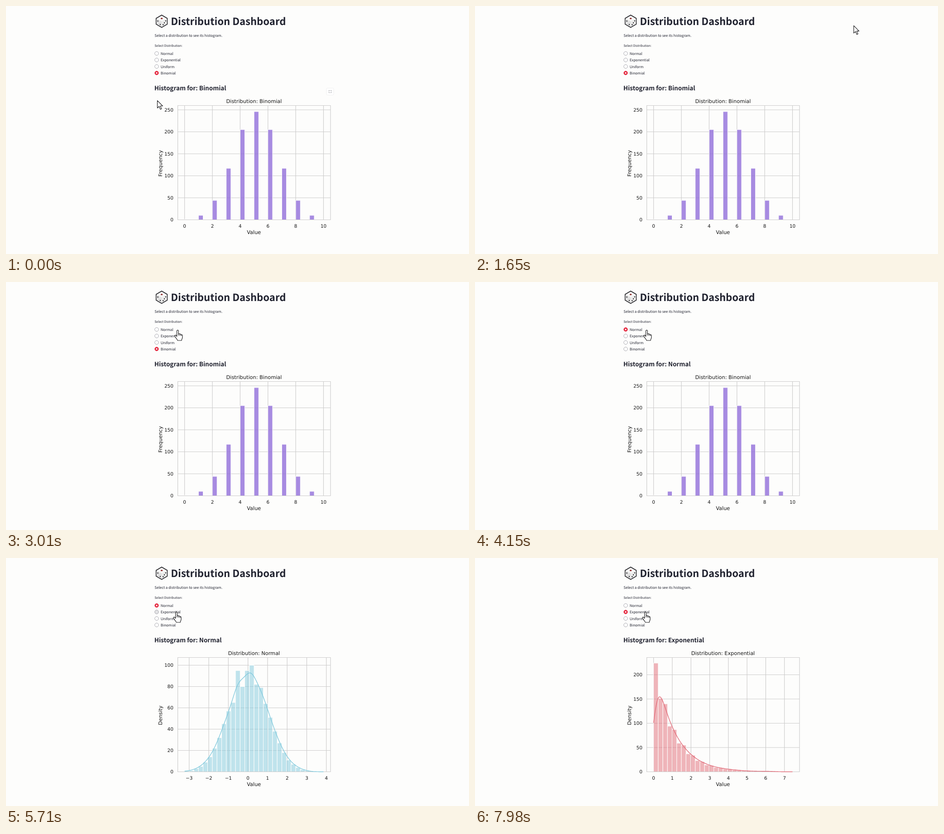
Write an HTML page that moves like this. It is 1023 px wide and 547 px high and loops after 8000 ms.

```html
<!DOCTYPE html>
<html lang="en">
<head>
<meta charset="utf-8">
<title>Distribution Dashboard</title>
<style>
  html, body { margin: 0; width: 100%; height: 100%; overflow: hidden; background: #fdfdfc; }
  svg { display: block; width: 1023px; height: 547px; }
  text { text-rendering: geometricPrecision; }
  .page { font-family: "Noto Sans CJK JP", "Noto Sans CJK SC", "Noto Sans", sans-serif; fill: #20222f; }
  .chart { font: 10.4px "DejaVu Sans", sans-serif; fill: #161616; }
  .chart .big { font-size: 11.34px; }
  .grid { fill: none; stroke: #cccbcb; stroke-width: 1.15; }
</style>
</head>
<body>
<svg viewBox="0 0 1023 547">
  <path d="M344 20L356.3 27.3V40L344 47.2L331.7 40V27.3Z" fill="#f6f6f5" stroke="#202024" stroke-width="1.7" stroke-linejoin="round"/>
  <path d="M344 34V46.2L332.6 39.5V28Z" fill="#e0e0e0"/>
  <path d="M344 34V46.2L355.4 39.5V28Z" fill="#ececeb"/>
  <ellipse cx="344" cy="27.4" rx="2.3" ry="1.5" fill="#8e2a2a"/>
  <path d="M335.5 33v.5M340.8 40.6v.5M347.2 41v.5M350 36.8v.5M352.8 32.6v.5" stroke="#26262a" stroke-width="2.3" stroke-linecap="round"/>
  <g class="page">
    <text x="364.3" y="42.3" font-size="22.1" font-weight="700">Distribution Dashboard</text>
    <text x="328.2" y="68.4" font-size="7.94">Select a distribution to see its histogram.</text>
    <text x="328.2" y="90.2" font-size="6.95">Select Distribution:</text>
    <text id="heading" x="327.8" y="185.7" font-size="13.5" font-weight="600"></text>
    <g id="radios"></g>
  </g>
  <g id="charts"></g>
  <g id="expand">
    <rect x="708" y="181" width="16" height="15.5" rx="2.5" fill="#fff" stroke="#ececec" stroke-width=".8"/>
    <path d="M713.6 188V186.4H715.2M717 186.4H718.6V188M718.6 189.6V191.2H717M715.2 191.2H713.6V189.6" fill="none" stroke="#85868d" stroke-width=".9"/>
  </g>
  <g id="cursor" fill="#fff" stroke="#1d1d1f" stroke-width="1.2" stroke-linejoin="round">
    <path id="arrow" d="M.5 .6V17L4.3 13.5L7.2 20L9.8 18.8L7 12.5H12.2Z"/>
    <path id="hand" d="M-2 2C-2-.5 1.6-.5 1.6 2V8.5C2.5 7.4 4.5 7.8 4.8 9.3C6 8.4 7.6 9 7.8 10.3C9.2 9.7 10.3 10.8 10.3 12V16C10.3 19 8.4 20 8.4 23H-.5C-.5 20.5-4.8 17.5-6.6 13.2C-7 11.3-4.8 10.6-3.6 12.2L-2 14.2ZM1.6 8.5V12M4.8 9.3V12.5M7.8 10.3V13"/>
  </g>
</svg>
<script>
const byId = id => document.getElementById(id);
const names = ['Normal', 'Exponential', 'Uniform', 'Binomial'];
const LEFT = 379.5, RIGHT = 717, TOP = 219.5, BASE = 471.5;
const BAR_START = 394.6, BAR_WIDTH = 10.23, BINS = 30;

const factorial = n => n < 2 ? 1 : n * factorial(n - 1);

// Expected counts of 1000 draws per bin, with a ripple for sampling variation
function normalCount(i) {
  const x = -3.25 + .2363 * (i + .5);
  const ripple = .17 * Math.cos(2.37 * (i - 11)) * Math.exp(-(((i - 12) / 3) ** 2));
  return 95 * Math.exp(-x * x / 2) * (1 + ripple);
}
const exponentialCount = i => 207 * Math.exp(-.235 * i) * (i % 2 ? .92 : 1.08);
function binomialCount(i) {
  const k = i / 3;
  return i % 3 ? 0 : 1000 / 1024 * factorial(10) / factorial(k) / factorial(10 - k);
}

// origin and unit are horizontal pixels; scale is pixels per count
const charts = {
  Normal: {
    origin: 534.6, unit: 43.3, first: -3, last: 4, xStep: 1, scale: 2.35, yStep: 20, max: 100,
    color: '#82cadd', alpha: .5, label: 'Density', count: normalCount, smooth: true
  },
  Exponential: {
    origin: 394.6, unit: 41.3, first: 0, last: 7, xStep: 1, scale: 1.07, yStep: 50, max: 200,
    color: '#e16c79', alpha: .5, label: 'Density', count: exponentialCount, smooth: true
  },
  Binomial: {
    origin: 394.6, unit: 30.69, first: 0, last: 10, xStep: 2, scale: .97, yStep: 50, max: 250,
    color: '#9370db', alpha: .8, label: 'Frequency', count: binomialCount
  }
};

const text = (x, y, str, anchor = 'middle', extra = '') =>
  `<text x="${x}" y="${y}" text-anchor="${anchor}" ${extra}>${str}</text>`;

// Gaussian density estimate, one bin wide
function densityPath(counts, scale) {
  const points = [];
  for (let u = 0; u <= BINS; u += .2) {
    const value = counts.reduce((sum, n, i) => sum + n * Math.exp(-((u - i - .5) ** 2) / 2), 0) / Math.sqrt(2 * Math.PI);
    points.push(`${(BAR_START + u * BAR_WIDTH).toFixed(2)} ${(BASE - value * scale).toFixed(2)}`);
  }
  return 'M' + points.join('L');
}

function drawChart(name) {
  const c = charts[name];
  const counts = Array.from({ length: BINS }, (_, i) => Math.round(c.count(i)));
  let grid = `M${LEFT} ${TOP}H${RIGHT}V${BASE}H${LEFT}Z`, labels = '', bars = '';
  for (let v = c.first; v <= c.last; v += c.xStep) {
    const x = c.origin + v * c.unit;
    grid += `M${x} ${TOP}V${BASE}`;
    labels += text(x, 488.8, String(v).replace('-', '−'));
  }
  for (let v = 0; v <= c.max; v += c.yStep) {
    const y = BASE - v * c.scale;
    grid += `M${LEFT} ${y}H${RIGHT}`;
    labels += text(369.8, y + 3.9, v, 'end');
  }
  counts.forEach((n, i) => {
    const h = n * c.scale;
    if (n) bars += `<rect x="${BAR_START + i * BAR_WIDTH}" y="${BASE - h}" width="${BAR_WIDTH}" height="${h}"/>`;
  });
  const curve = c.smooth
    ? `<path d="${densityPath(counts, c.scale)}" fill="none" stroke="${c.color}" stroke-width="1.4"/>` : '';
  return `<g id="chart${name}" class="chart"><path class="grid" d="${grid}"/>
    <g fill="${c.color}" fill-opacity="${c.alpha}" stroke="#fdfdfc">${bars}</g>
    <path class="grid" d="M${LEFT} ${BASE}H${RIGHT}"/>${curve}${labels}
    ${text(548, 213.8, 'Distribution: ' + name, 'middle', 'class="big"')}
    ${text(547.8, 503, 'Value', 'middle', 'class="big"')}
    ${text(0, 0, c.label, 'middle', 'class="big" transform="translate(345 347) rotate(-90)"')}</g>`;
}

byId('charts').innerHTML = Object.keys(charts).map(drawChart).join('');
byId('radios').innerHTML = names.map((name, i) => {
  const y = 104.7 + 14.35 * i;
  return `<circle id="ring${name}" cx="332.9" cy="${y}" r="4.2" stroke-width=".7"/>
    <circle id="dot${name}" cx="332.9" cy="${y}" r="1.7" fill="#fff"/>
    ${text(341.8, y + 3.3, name, 'start', 'font-size="7.94"')}`;
}).join('');

// time, x, y of the pointer tip
const route = [
  [0, 334, 208], [450, 317, 198], [850, 324, 180], [1650, 836, 43], [1880, 920, 2],
  [2600, 379.5, 106], [4250, 379.5, 106], [4450, 376.7, 119], [8000, 376.7, 119]
];

function pointerAt(t) {
  const i = route.findIndex(p => p[0] > t);
  const [a, b] = [route[i - 1], route[i]];
  const k = (t - a[0]) / (b[0] - a[0]);
  return [a[1] + (b[1] - a[1]) * k, a[2] + (b[2] - a[2]) * k];
}

const stageName = (t, toNormal, toExponential) =>
  t < toNormal ? 'Binomial' : t < toExponential ? 'Normal' : 'Exponential';
const show = (id, on) => byId(id).setAttribute('visibility', on ? 'visible' : 'hidden');

function render(now) {
  const t = now % 8000;
  const selected = stageName(t, 3700, 6350), plotted = stageName(t, 4250, 6900);
  const [x, y] = pointerAt(t);
  const pointing = t > 2560;
  const hovered = t >= 4400 ? 'Exponential' : '';

  byId('heading').textContent = 'Histogram for: ' + selected;
  for (const name of names) {
    const on = name === selected, ring = byId('ring' + name);
    ring.setAttribute('fill', on ? '#e5283f' : name === hovered ? '#e4e4e6' : '#fff');
    ring.setAttribute('stroke', on ? '#e5283f' : '#85858f');
    show('dot' + name, on);
  }
  for (const name in charts) show('chart' + name, name === plotted);
  show('expand', t < 450);
  show('arrow', !pointing);
  show('hand', pointing);
  byId('cursor').setAttribute('transform', `translate(${x} ${y})`);
  requestAnimationFrame(render);
}
requestAnimationFrame(render);
</script>
</body>
</html>
```
